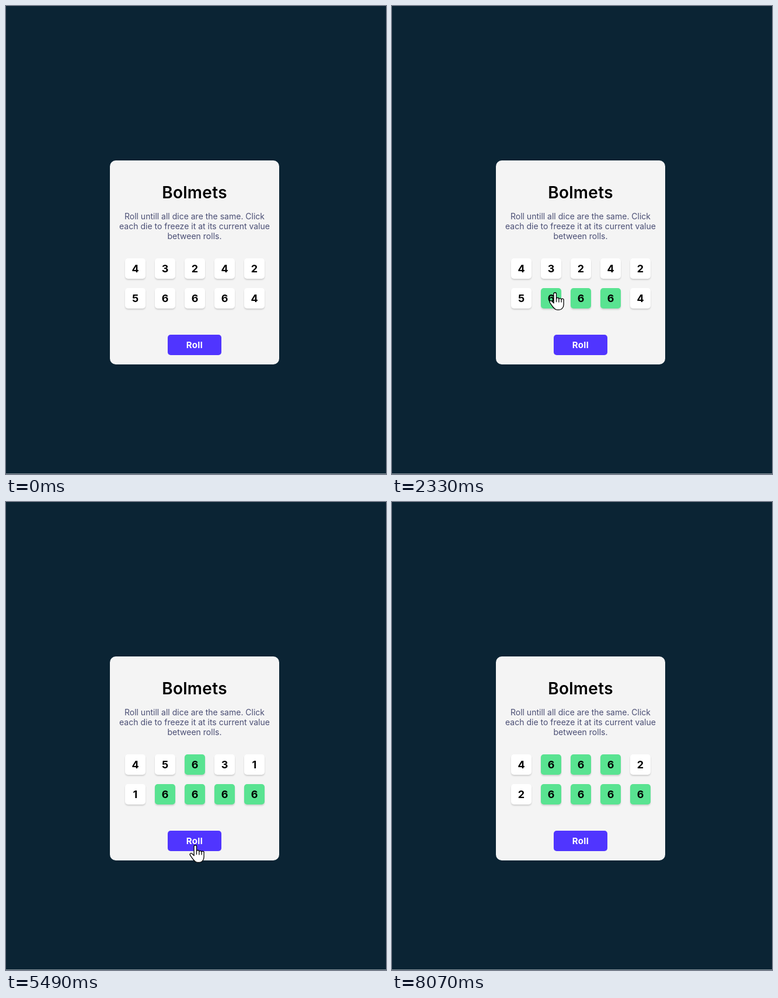
Animation, 651 px wide and 803 px high, one loop 8.47 s. Source, as an HTML page:

```html
<!DOCTYPE html>
<html lang="en">
<head>
<meta charset="utf-8">
<title>Dice game</title>
<style>
  html, body { margin: 0; width: 100%; height: 100%; overflow: hidden; background: #0b2434; }
  svg { display: block; font-family: Inter, "Open Sans", sans-serif; text-anchor: middle; }
  .title { font-size: 28px; font-weight: 600; letter-spacing: .3px; }
  .intro { font-size: 14px; fill: #4a4e74; }
  .die rect { filter: drop-shadow(0 2px 1px rgba(0, 0, 0, .15)); }
  .die text { font-size: 18px; font-weight: 700; }
  .roll { font-size: 15px; font-weight: 700; letter-spacing: .4px; fill: #fff; }
  .pointer { fill: #fff; stroke: #000; stroke-width: 1.3; stroke-linejoin: round; stroke-linecap: round; }
</style>
</head>
<body>
<svg width="651" height="803" viewBox="0 0 651 803">
  <rect width="651" height="803" fill="#0b2434"/>
  <rect y="802" width="651" height="1" fill="#8a969e"/>
  <rect x="178" y="265" width="290" height="350" rx="10" fill="#f4f4f4"/>
  <text class="title" x="323" y="330">Bolmets</text>
  <g class="intro">
    <text x="323" y="366">Roll untill all dice are the same. Click</text>
    <text x="323" y="383">each die to freeze it at its current value</text>
    <text x="323" y="400">between rolls.</text>
  </g>
  <g id="dice"></g>
  <rect x="277" y="564" width="92" height="35" rx="5" fill="#5035ff"/>
  <text class="roll" x="323" y="587">Roll</text>
  <g id="pointer" class="pointer">
    <path id="arrow" d="M0 0v25.5l6-6 3.7 9 3.8-1.5-3.8-9H18z"/>
    <path id="hand" d="M-2 3a2.2 2.2 0 0 1 4.5 0v8.5a2.2 2.2 0 0 1 4.4.4a2.2 2.2 0 0 1 4.2.8a2 2 0 0 1 4 1.2v7c0 6-4 9.5-8 9.5h-3c-5 0-8-6-12-11.5c-2.5-3.5.5-5.5 3-3.2l3 3zM2.5 11.5v5M6.9 12v5M11.1 13v4"/>
  </g>
</svg>
<script>
const LOOP = 8470, SIZE = 35, CLICK_DELAY = 150, BOW = 0.2;
const $ = id => document.getElementById(id);

const rolls = ["4324256664", "4563116666", "4666226666"];

// Each move ends at x, y; a click on a die (by index) or on the button follows.
const entry = { x: 522, y: 760 };
const moves = [
  { start: 110, end: 580, x: 381, y: 521 },
  { start: 880, end: 970, x: 375, y: 513, click: 8 },
  { start: 1440, end: 1600, x: 325, y: 498, click: 7 },
  { start: 1800, end: 2180, x: 279, y: 491, click: 6 },
  { start: 2820, end: 3150, x: 320, y: 574, click: "roll" },
  { start: 3650, end: 4190, x: 319, y: 448, click: 2 },
  { start: 4570, end: 4810, x: 423, y: 494, click: 9 },
  { start: 5110, end: 5260, x: 324, y: 588 },
  { start: 5490, end: 5560, x: 324, y: 577, click: "roll" },
  { start: 6090, end: 6350, x: 278, y: 452, click: 1 },
  { start: 6560, end: 7190, x: 374, y: 452, click: 3 },
  { start: 7540, end: 8000, x: 587, y: 790 }
];

const dice = Array.from({ length: 10 }, (_, i) => {
  const x = 204 + i % 5 * 51, y = i < 5 ? 433 : 484;
  const add = (parent, tag, attrs) => {
    const el = document.createElementNS("http://www.w3.org/2000/svg", tag);
    for (const key in attrs) el.setAttribute(key, attrs[key]);
    return parent.appendChild(el);
  };
  const group = add($("dice"), "g", { class: "die" });
  return {
    x, y,
    face: add(group, "rect", { x, y, width: SIZE, height: SIZE, rx: 5 }),
    label: add(group, "text", { x: x + 17.5, y: y + 24 })
  };
});

const ease = k => k * k * k * (10 + k * (6 * k - 15));

// Eased travel along a slight bow, always to the left of the heading.
function pointerAt(t) {
  const i = moves.findLastIndex(m => m.start <= t);
  if (i < 0 || t >= moves.at(-1).end) return null;
  const to = moves[i], from = moves[i - 1] || entry;
  const k = ease(Math.min(1, (t - to.start) / (to.end - to.start)));
  const dx = to.x - from.x, dy = to.y - from.y;
  const bow = BOW * Math.sin(Math.PI * k);
  return { x: from.x + dx * k + dy * bow, y: from.y + dy * k - dx * bow };
}

const inside = (p, x, y, w) => p.x >= x && p.x <= x + w && p.y >= y && p.y <= y + SIZE;
const show = (id, on) => $(id).style.display = on ? "" : "none";

function draw(t) {
  const clicks = moves.filter(m => m.end + CLICK_DELAY <= t).map(m => m.click);
  const values = rolls[clicks.filter(c => c === "roll").length];
  dice.forEach((die, i) => {
    die.label.textContent = values[i];
    die.face.setAttribute("fill", clicks.includes(i) ? "#59e391" : "#fff");
  });

  const p = pointerAt(t);
  show("pointer", p);
  if (!p) return;
  const hover = inside(p, 277, 564, 92) || dice.some(d => inside(p, d.x, d.y, SIZE));
  $("pointer").setAttribute("transform", `translate(${p.x} ${p.y})`);
  show("hand", hover);
  show("arrow", !hover);
}

const start = performance.now();
function tick() {
  draw((performance.now() - start) % LOOP);
  requestAnimationFrame(tick);
}
tick();
</script>
</body>
</html>
```
